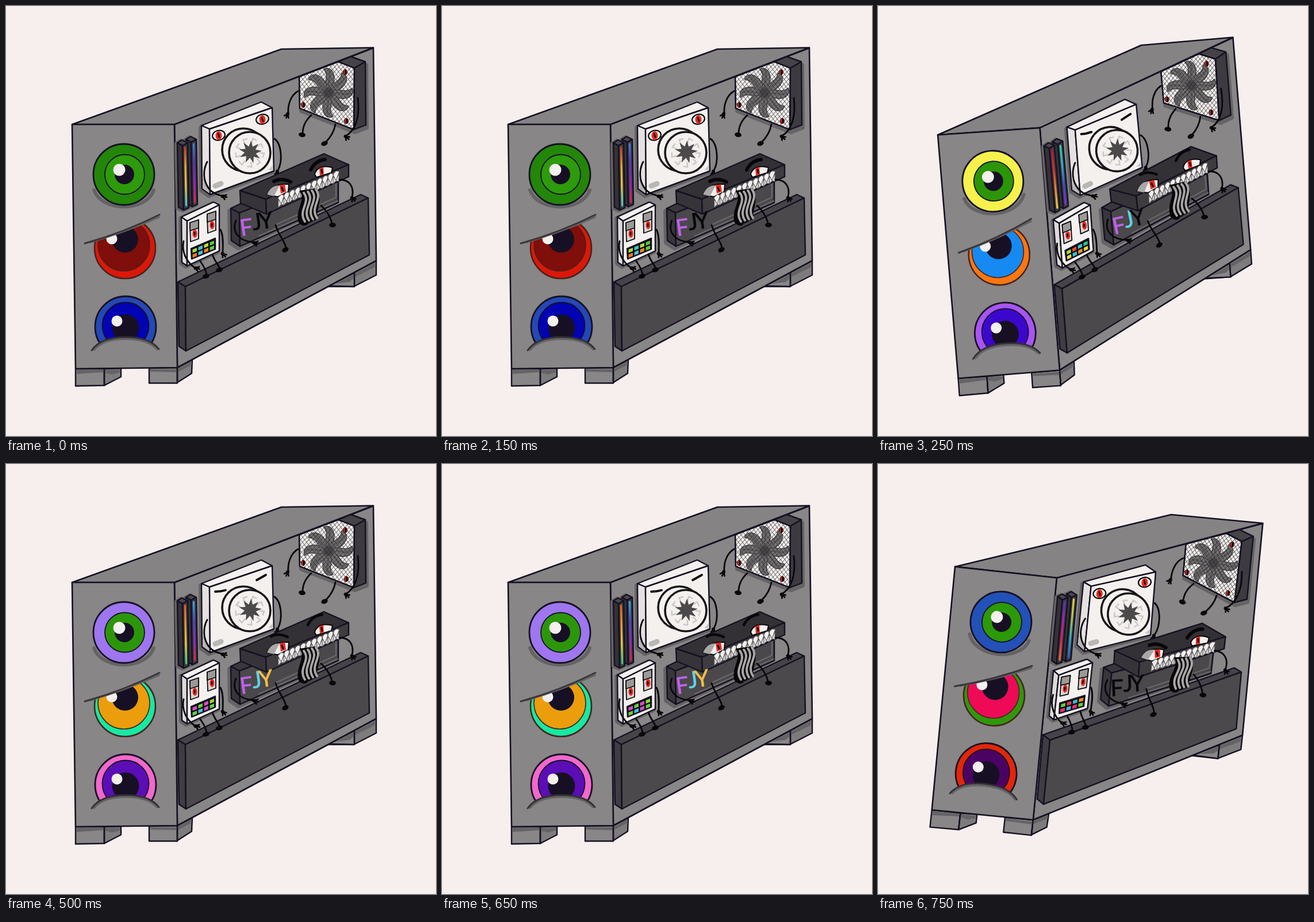
Recreate the animation shown at these times as an HTML page with a canvas. Size 748 px wide and 748 px high, loop 1000 ms.

```html
<!DOCTYPE html>
<html lang="en">
<head>
<meta charset="utf-8">
<title>Grumpy computer</title>
<style>
html, body { margin: 0; width: 100%; height: 100%; overflow: hidden; background: #f7efee; }
canvas { display: block; width: 748px; height: 748px; }
</style>
</head>
<body>
<canvas id="stage" width="748" height="748"></canvas>
<script>
const c = document.getElementById('stage').getContext('2d');
const INK = '#151022', BLACK = '#080709', CASE = '#888686', SHADE = '#656365';
const WHITE = '#f4f0ee', RED = '#e9281c';
const PURPLE = '#c062ee', CYAN = '#5fd3ea', GOLD = '#f5bd45';

// Tilt in degrees about x, y; eye colours are [ring, iris] from top to bottom.
const poses = [
  { tilt: 0, x: 374, y: 374, awake: true,
    eyes: [['#238609', '#2d9b0b'], ['#dd1708', '#800e0b'], ['#2448b6', '#0203b2']],
    leds: [['#c43a20', '#f0a828', '#e8c83c', '#30c8d8'], ['#3488d8', '#5a30c0', '#a020c8', '#d82848']],
    keys: ['#a6d83a', '#3fc0d8', '#b8d838', '#58c83c', '#ee7a24', '#48c4d8', '#ee8424', '#62cc3c'],
    text: [PURPLE, BLACK, BLACK] },
  { tilt: -4, x: 371, y: 373, awake: false,
    eyes: [['#f6f14c', '#2b9507'], ['#fb7610', '#168af2'], ['#a854f3', '#3c07cc']],
    leds: [['#b01838', '#e02c28', '#ee8428', '#ecd838'], ['#20d8a0', '#20b8d8', '#3450d0', '#8a28d8']],
    keys: ['#a8dc3c', '#e84830', '#38c4d8', '#2cc488', '#eed83c', '#38c4d8', '#f09028', '#e8d43c'],
    text: [PURPLE, CYAN, BLACK] },
  { tilt: 0, x: 374, y: 374, awake: false,
    eyes: [['#9e76ef', '#2c960b'], ['#16e9a2', '#eb9d0c'], ['#f168cc', '#5b0db6']],
    leds: [['#e05c20', '#f09828', '#e8d038', '#28cc80'], ['#30b0e0', '#4848d0', '#9028d0', '#dc2840']],
    keys: ['#d84cc8', '#68d03c', '#d84cc8', '#90d83c', '#62d43c', '#40c4dc', '#d44cc8', '#62d43c'],
    text: [PURPLE, CYAN, GOLD] },
  { tilt: 6.25, x: 375, y: 366, awake: true,
    eyes: [['#2451b8', '#2b9908'], ['#30970c', '#ee0a57'], ['#e42508', '#4b0363']],
    leds: [['#5030c0', '#b020b0', '#e02450', '#f07828'], ['#ecd038', '#a8cc40', '#20b4d0', '#3058d0']],
    keys: ['#68cc3c', '#e83464', '#38bcd4', '#f09028', '#e83070', '#38c0d8', '#e83070', '#68cc3c'],
    text: [BLACK, BLACK, BLACK] }
];

function shape(d, fill, line = INK, width = 2.4) {
  const p = new Path2D(d);
  if (fill) { c.fillStyle = fill; c.fill(p); }
  if (line) { c.strokeStyle = line; c.lineWidth = width; c.stroke(p); }
}
const stroke = (d, color = BLACK, width = 3) => shape(d, null, color, width);

function oval(x, y, rx, ry, fill, line, width = 2.4, turn = 0) {
  c.beginPath();
  c.ellipse(x, y, rx, ry, turn, 0, 7);
  if (fill) { c.fillStyle = fill; c.fill(); }
  if (line) { c.strokeStyle = line; c.lineWidth = width; c.stroke(); }
}
const disc = (x, y, r, fill, line, width) => oval(x, y, r, r, fill, line, width);

function shadow(d, dx, dy) {
  c.save();
  c.translate(dx, dy);
  shape(d, SHADE, SHADE, 6);
  c.restore();
}

function clipped(d, draw) {
  c.save();
  c.clip(new Path2D(d));
  draw();
  c.restore();
}

function arm(d, x, y, turn) {
  stroke(d, BLACK, 2.8);
  c.save();
  c.translate(x, y);
  c.rotate(turn);
  oval(0, 0, 3.5, 3, BLACK);
  stroke('M0 0 L6 -3 M0 0 L7 1 M0 0 L4 5', BLACK, 2.8);
  c.restore();
}

function leg(d, x, y, turn) {
  stroke(d, BLACK, 2.8);
  oval(x, y, 6, 4, BLACK, null, 0, turn);
}

function chassis() {
  shape('M121 631H171V660L121 661Z M249 630L298 629V656H249Z', CASE);
  shape('M171 631L200 630V645L171 660Z M298 629L324 615L323 639L298 655Z', '#7d7b7c');
  shape('M560 488H605L644 468V443Z', '#7d7b7c');
  shape('M561 487L606 464V488Z', CASE);
  shape('M123 633H199V637L184 641L169 637L123 640Z M251 632H298L323 617V624L298 637L251 636Z M574 483L642 447V454L608 471L598 480Z', SHADE, null);
  stroke('M171 632V660M298 629V656M606 463V488', INK, 2.4);
  shape('M293 206L639 73L644 443L298 629Z', CASE, INK, 2.6);
  shape('M115 206L479 75L639 72.5L293 206Z', '#858384', INK, 2.6);
  shape('M115 206L293 206L298 629L121 631Z', CASE, INK, 2.6);
}

function pupil(x, y, r, hx, hy, hr) {
  disc(x, y, r, '#171024');
  disc(hx, hy, hr, WHITE);
}

function frontEyes(eyes) {
  stroke('M153 320C166 359 244 359 257 320', SHADE, 6);
  disc(205, 293, 53, eyes[0][0], INK, 2.8);
  disc(206.5, 293, 34.5, eyes[0][1], INK, 1.8);
  pupil(206, 293, 17, 197, 285, 10.5);

  clipped('M137 413Q205 394 267 363V490H137Z', () => {
    disc(207, 421, 53, eyes[1][0], '#45231f', 2.6);
    disc(205, 416, 45, eyes[1][1], '#45231f', 1.6);
    pupil(207, 406, 23, 184, 405, 9.5);
  });
  stroke('M146 411Q207 393 266 367', SHADE, 3.6);
  stroke('M137 413Q205 394 267 363', '#39363b', 3);

  clipped('M149 599Q165 576 208 576Q250 576 266 597V490H149Z', () => {
    disc(208, 558, 53, eyes[2][0], INK, 2.8);
    disc(208, 556, 40.5, eyes[2][1], INK, 1.8);
    pupil(208, 560, 23.5, 193, 548, 9.5);
  });
  stroke('M153 598Q169 579 208 579Q247 579 263 597', SHADE, 4);
  stroke('M149 599Q165 576 208 576Q250 576 266 597', '#333036', 2.8);
}

function memory(x, y, colors) {
  c.save();
  c.translate(x, y);
  shadow('M0 5L8 0L18 5L20 118L11 122L2 118Z', -2, 1);
  shape('M0 5L8 0L18 5L9 10Z', '#49474b');
  shape('M0 5L9 10L11 122L2 117Z', '#343237');
  shape('M9 10L18 5L20 118L11 122Z', '#3d3a40');
  const g = c.createLinearGradient(0, 12, 0, 116);
  colors.forEach((k, i) => g.addColorStop(i / 3, k));
  stroke('M13.5 13L15.5 114', g, 3.2);
  c.restore();
}

function fan() {
  const face = 'M510 123L578 97L606 108L605 215L511 178Z';
  shadow('M510 123L600 89L625 97L626 207L605 215L511 178Z', 2, 5);
  shape('M578 97L600 88L625 97L606 108Z', '#464348');
  shape('M606 108L625 97L626 207L605 215Z', '#3d3b3f');
  shape(face, WHITE);
  clipped(face, () => {
    for (let i = 0; i < 8; i++) {
      c.save();
      c.translate(561, 151);
      c.rotate(i * Math.PI / 4);
      shape('M-3 -8C-10 -19 3 -29 -8 -41C7 -48 16 -26 5 -8Z', '#757373', '#555355', 2);
      stroke('M1 -11C-2 -20 6 -27 1 -38', '#5d5b5c', 3);
      c.restore();
    }
    disc(561, 151, 9, '#474547', '#555355', 2);
    let d = '';
    for (let i = -130; i < 130; i += 7.2) {
      d += `M${510 + i} 90L${610 + i} 222M${510 + i} 222L${630 + i} 90`;
    }
    stroke(d, '#29272a', 0.75);
  });
  stroke(face, INK, 2.2);
  for (const [x, y] of [[590, 115], [517, 172], [592, 200]]) {
    oval(x, y, 3.5, 4.5, '#b92520', '#3a0d0d', 1);
    stroke(`M${x + 1} ${y - 3}v6`, BLACK, 2.5);
  }
  arm('M508 148C494 156 490 174 491 187', 490, 188, 1.8);
  arm('M612 160C616 192 608 217 591 226', 591, 227, 0.6);
  leg('M531 190C520 200 516 212 516 222', 515, 224, 0.2);
  leg('M573 206C570 222 562 231 556 237', 554, 239, -0.4);
}

function pumpEye(x, y) {
  oval(x, y, 11, 8.5, WHITE, BLACK, 2.2, -0.25);
  oval(x, y + 0.5, 5.5, 7.5, RED);
  stroke(`M${x - 1} ${y - 3}l2 6`, BLACK, 2.5);
}

function pump(awake) {
  shadow('M340 208L444 167L463 177L466 287L355 328L341 318Z', -2, 3);
  shape('M340 208L444 167L463 177L354 214Z', WHITE);
  shape('M340 208L354 214L355 328L341 318Z', '#e5e1e0');
  shape('M342 298L354 316V326L342 317Z', '#b8b5b5', null);
  shape('M354 214L463 177L466 287L355 328Z', WHITE);
  stroke('M364 313L374 309', '#b9b6b6', 9);
  shape('M456 285L464 277V286Z', '#c9c6c6', null);
  disc(413, 250, 37, WHITE, '#161417', 3.6);
  disc(424, 255, 36, WHITE, '#161417', 3.6);
  let star = '';
  for (let i = 0; i < 18; i++) {
    const a = i * Math.PI / 9 - 1.5, r = i % 2 ? 10 : 20;
    star += `${i ? 'L' : 'M'}${425 + r * Math.cos(a)} ${254 + r * Math.sin(a)}`;
  }
  for (let i = 0; i < 9; i++) {
    c.save();
    c.translate(424, 255);
    c.rotate(i * Math.PI / 4.5 + 0.2);
    stroke('M17 -3L25 -4L24 3', '#cbc8c8', 2.4);
    c.restore();
  }
  shape(star + 'Z', '#4b494a', null);
  if (awake) {
    pumpEye(370, 225);
    pumpEye(446, 197);
  } else {
    stroke('M364 222Q374 222 382 219.5M436 202L452 193', BLACK, 3.8);
  }
  arm('M350 271C339 291 344 324 375 330', 377, 331, 0.1);
  arm('M467 231C479 239 482 269 473 286', 472, 288, 1.4);
}

function bot(keys) {
  shadow('M305 367L361 341L371 346V426L315 452L306 446Z', -2, 2);
  shape('M305 367L361 341L371 346L315 374Z', WHITE);
  shape('M305 367L315 374V452L306 446Z', '#dedad9');
  shape('M315 374L371 346V426L315 452Z', WHITE);
  for (const [x, y] of [[320, 377], [350, 362]]) {
    shape(`M${x} ${y}l15 -5v33l-14 5Z`, '#d8d4d3', BLACK, 1.8);
    shape(`M${x} ${y}l15 -5v14l-15 5Z`, '#9c9999', BLACK, 1.8);
    oval(x + 8.5, y + 19, 4, 7, RED);
    stroke(`M${x + 8} ${y + 17}v4`, BLACK, 2.5);
  }
  shape('M322 422L364 404V423L323 440Z', BLACK);
  keys.forEach((k, i) => {
    const col = i % 4, x = 324.5 + col * 10, y = 423.5 - col * 4.2 + (i > 3 ? 8.5 : 0);
    shape(`M${x} ${y}l7.5 -3v6l-7.5 3Z`, k, null);
  });
  arm('M309 409C305 428 314 445 328 455', 330, 456, 0.1);
  arm('M373 389C379 400 377 419 377 429', 377, 431, 0.7);
  leg('M338 444C345 454 349 462 349 469', 348, 470, -0.3);
  leg('M359 432C363 445 371 451 372 458', 371, 459, -0.3);
}

function shroud() {
  shape('M299 480L617 328L630 334L312 488Z', '#464448');
  shape('M299 480L312 488L313 600L301 592Z', '#403d42');
  shape('M312 488L630 334L632 433L313 600Z', '#4c494c');
}

function teeth() {
  const n = 11, at = (i, off) => `${474 + i * 105 / n} ${333 - i * 45 / n + off}`;
  let upper = '', lower = '';
  for (let i = 0; i < n; i++) {
    upper += `M${at(i - 0.1, 0)}L${at(i + 0.5, -3)}L${at(i + 1.1, 0)}L${at(i + 0.5, 13)}Z`;
    lower += `M${at(i, 17)}L${at(i + 0.5, 14)}L${at(i + 1, 17)}L${at(i + 1, 5)}L${at(i + 0.5, 11)}L${at(i, 5)}Z`;
  }
  shape(lower, '#dcd8d7', '#6a6769', 0.8);
  shape(upper, WHITE, '#4f4c50', 1);
}

function label(colors) {
  c.font = '40px Lato, sans-serif';
  c.textAlign = 'center';
  c.lineWidth = 0.6;
  [['F', 420, 399], ['J', 438, 389], ['Y', 454, 387]].forEach(([ch, x, y], i) => {
    c.save();
    c.translate(x, y);
    c.rotate(-0.14);
    c.fillStyle = c.strokeStyle = colors[i];
    c.fillText(ch, 0, 0);
    c.strokeText(ch, 0, 0);
    c.restore();
  });
}

function cardEyes(awake) {
  shape('M454 328C460 314 472 309 492 310L491 323L473 332Z', WHITE, BLACK, 2);
  shape('M454 328C459 316 466 312 476 312L466 331Z', '#aaa7a7', null);
  shape('M537 293C539 282 551 276 568 281L566 290L540 298Z', WHITE, BLACK, 2);
  shape('M476 312L485 310L487 323L478 326Z M545 282L552 280L553 293L546 295Z', RED, null);
  stroke('M480 316l2 5M549 285l1 5', BLACK, 3);
  c.save();
  if (awake) c.translate(5, 5);
  stroke('M461 300Q474 293 490 301', BLACK, awake ? 6 : 4.5);
  stroke('M525 280Q533 264 550 262', BLACK, awake ? 6 : 4.5);
  c.restore();
}

function card(pose) {
  shadow('M391 352L413 343L578 300V338L407 418L392 408Z', -3, 4);
  shape('M391 352L420 338L440 346L406 360Z', '#39373b');
  shape('M391 352L406 360L407 418L392 408Z', '#38363a');
  shape('M406 360L578 294V342L407 418Z', '#4a484a');
  stroke('M440 400L577 339M574 305V333L470 380', '#6c696b', 2);
  shape('M407 321L452 336L453 362L408 343Z', '#363438');
  shape('M407 321L553 257L596 276L452 336Z', '#333135');
  shape('M452 336L596 276V297L453 362Z', '#3f3c40');
  cardEyes(pose.awake);
  teeth();
  shape('M512 322C523 338 505 352 509 374C512 382 522 383 524 378L540 370C538 355 551 340 540 318Z', BLACK, BLACK, 2);
  for (let i = 0; i < 4; i++) {
    const x = 518 + i * 7, y = 325 - i * 2;
    stroke(`M${x} ${y}C${x + 13} ${y + 17} ${x - 11} ${y + 30} ${x + 2} ${y + 50}`, '#a9a6a6', 4);
  }
  label(pose.text);
  arm('M400 373C392 393 405 409 430 411', 432, 412, 0.1);
  arm('M580 302C598 302 606 315 602 332', 602, 334, 0.7);
  leg('M469 381C474 399 486 410 487 421', 486, 424, -0.5);
  leg('M548 347C560 358 566 371 567 379', 568, 381, 0);
}

function draw(ms) {
  const pose = poses[Math.floor(ms % 1000 / 250)];
  c.setTransform(1, 0, 0, 1, 0, 0);
  c.fillStyle = '#f7efee';
  c.fillRect(0, 0, 748, 748);
  c.lineCap = c.lineJoin = 'round';
  c.translate(pose.x, pose.y);
  c.rotate(pose.tilt * Math.PI / 180);
  c.translate(-pose.x, -pose.y);
  chassis();
  frontEyes(pose.eyes);
  memory(313, 227, pose.leds[1]);
  memory(298, 233, pose.leds[0]);
  fan();
  pump(pose.awake);
  shroud();
  card(pose);
  bot(pose.keys);
}

const start = performance.now();
function tick() {
  draw(performance.now() - start);
  requestAnimationFrame(tick);
}
tick();
</script>
</body>
</html>
```
